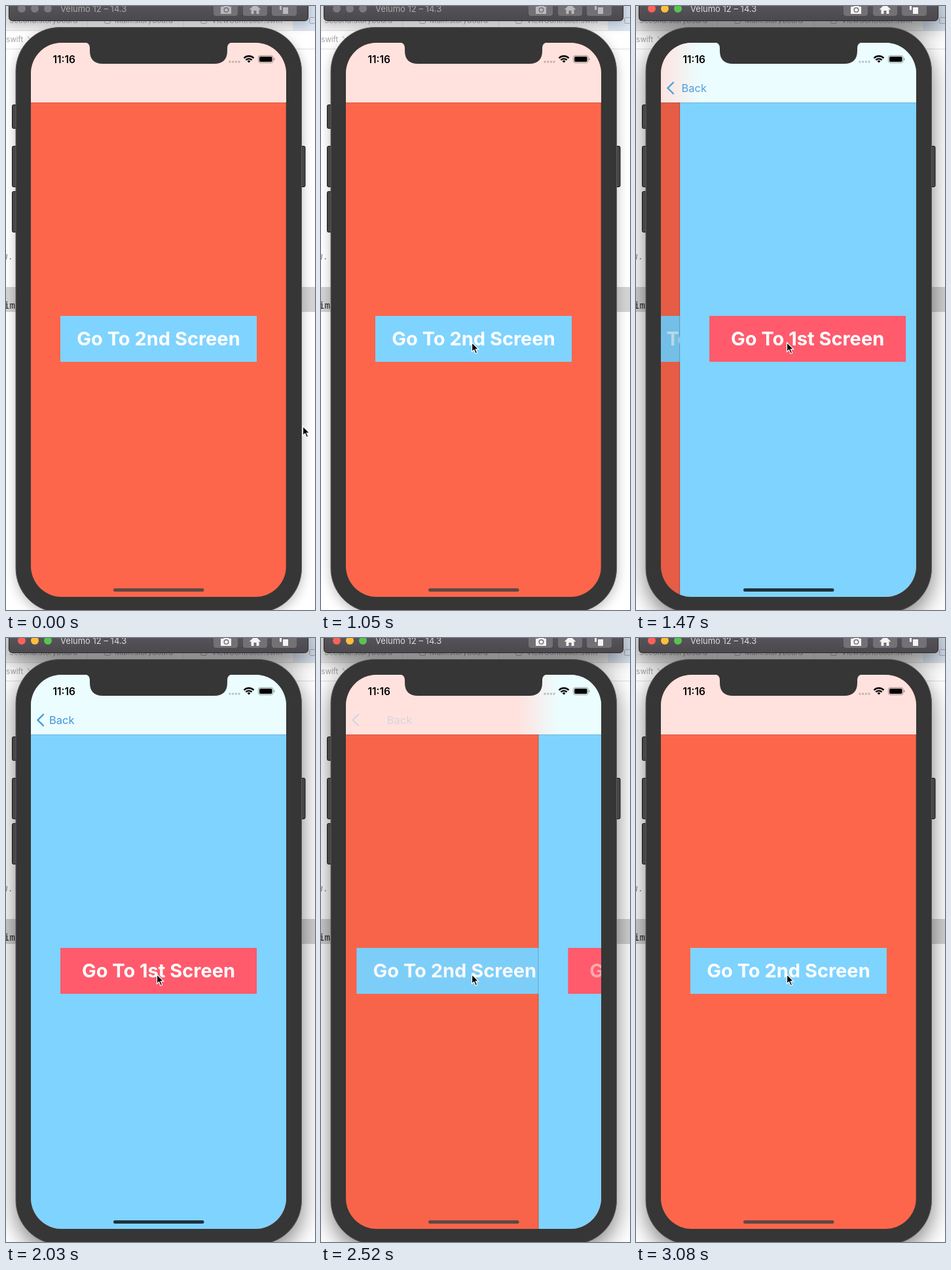
An HTML page that plays this animation: 472x920 px, repeating every 3.15 s.

```html
<!DOCTYPE html>
<html lang="en">
<head>
<meta charset="utf-8">
<title>Screen push and pop</title>
<style>
  html, body { margin: 0; width: 100%; height: 100%; overflow: hidden; background: #fff; }
  svg { display: block; width: 472px; height: 920px; font-family: Inter, "Open Sans", sans-serif; }
  .label { font-size: 29px; font-weight: 700; fill: #fff; text-anchor: middle; }
  .tab { font-size: 11.5px; fill: #a2a2a2; }
  .code { font: 14px "Noto Sans Mono", "DejaVu Sans Mono", monospace; }
  .side rect { fill: #464646; stroke: #161616; }
  .tools rect { fill: #737175; }
</style>
</head>
<body>
<svg viewBox="0 0 472 920">
  <defs>
    <clipPath id="screen"><rect x="38" y="56" width="390" height="844" rx="47"/></clipPath>
    <linearGradient id="barFill" gradientUnits="userSpaceOnUse" y1="0" y2="0">
      <stop stop-color="#ffe2de"/><stop offset="1" stop-color="#ebfdff"/>
    </linearGradient>
    <linearGradient id="titleFill" x2="0" y2="1">
      <stop offset=".3" stop-color="#59575b"/><stop offset="1" stop-color="#4b494d"/>
    </linearGradient>
    <filter id="soft" x="-30%" y="-30%" width="160%" height="160%"><feGaussianBlur id="blur"/></filter>
  </defs>

  <!-- editor behind the simulator -->
  <rect width="472" height="37" fill="#f1f1f1"/>
  <rect x="438" width="34" height="37" fill="#dbe5f3"/>
  <path d="M0 37.5H472M0 65.5H472M124.500 10V37M271.500 10V37" stroke="#dedede"/>
  <g fill="none" stroke="#a8a8a8">
    <rect x="150.500" y="17.500" width="9" height="9" rx="2"/>
    <rect x="297.500" y="17.500" width="9" height="9" rx="2"/>
    <rect x="463.500" y="17.500" width="9" height="9" rx="2"/>
    <path d="M33 46l4 5-4 5"/>
  </g>
  <text class="tab" x="5" y="26">Second.storyboard</text>
  <text class="tab" x="166" y="26">Main.storyboard</text>
  <text class="tab" x="314" y="26">ViewController.swift</text>
  <text class="tab" x="-3" y="55">.swift</text>
  <rect y="428" width="472" height="38" fill="#d3d3d3"/>
  <text class="code" x="-6" y="386" fill="#777">w.</text>
  <text class="code" x="-3" y="461" fill="#222">im</text>

  <g id="shadow" filter="url(#soft)">
    <rect x="4" y="-20" width="458" height="42"/>
    <rect x="15" y="32" width="437" height="892" rx="68"/>
  </g>

  <!-- title bar -->
  <rect x="4.500" y="-20" width="457" height="42.500" rx="5" fill="url(#titleFill)" stroke="#29282a"/>
  <g id="lights"><circle cx="24" cy="4" r="6"/><circle cx="44" cy="4" r="6"/><circle cx="64" cy="4" r="6"/></g>
  <text id="title" x="83" y="9" font-size="13">Velumo 12 – 14.3</text>
  <g class="tools">
    <rect x="317" y="-8" width="37" height="23" rx="4"/>
    <rect x="362" y="-8" width="37" height="23" rx="4"/>
    <rect x="406" y="-8" width="38" height="23" rx="4"/>
  </g>
  <g id="icons">
    <path d="M328 1h4l2-3h5l2 3h3v11h-16z"/>
    <circle cx="336.500" cy="6" r="3.300" fill="none" stroke="#737175" stroke-width="1.500"/>
    <path d="M372 5l8.500-8 8.500 8-1 1-1.500-1v7h-4v-5h-4v5h-4v-7l-1.500 1z"/>
    <path d="M423 2h8v10h-8zM418-4h8v4h-5v6h-3z"/>
  </g>

  <!-- phone -->
  <g class="side">
    <rect x="9.500" y="150.500" width="8" height="36" rx="2"/>
    <rect x="9.500" y="213.500" width="8" height="62" rx="2"/>
    <rect x="9.500" y="282.500" width="8" height="62" rx="2"/>
    <rect x="449" y="213.500" width="8" height="62" rx="2"/>
  </g>
  <rect x="15" y="32.500" width="436.500" height="891" rx="67" fill="#363636" stroke="#5c5c5c"/>

  <g clip-path="url(#screen)">
    <g id="first">
      <rect x="38" y="56" width="507" height="844" fill="#fe664b"/>
      <rect x="83" y="472" width="300" height="70" fill="#7fd3ff"/>
      <text id="label1" class="label" x="233" y="517">Go To 2nd Screen</text>
    </g>
    <rect id="dim" x="38" y="56" width="390" height="844"/>
    <g id="second">
      <rect x="38" y="56" width="390" height="844" fill="#7fd3ff"/>
      <path d="M37.500 147V900" stroke="#000" stroke-opacity=".2"/>
      <rect x="83" y="472" width="300" height="70" fill="#ff5b6d"/>
      <text id="label2" class="label" x="233" y="517">Go To 1st Screen</text>
    </g>
    <rect x="38" y="56" width="390" height="91" fill="url(#barFill)"/>
    <path d="M38 147.300H428" stroke="#000" stroke-opacity=".25" stroke-width=".7"/>
    <g id="back" fill="#3f97da">
      <path d="M57 116.500l-8.500 8.500 8.500 8.500" fill="none" stroke="#3f97da" stroke-width="2.400" stroke-linecap="round"/>
      <text id="backText" x="66" y="131" font-size="16.500">Back</text>
    </g>
    <rect id="home" x="164" y="887" width="138.500" height="5" rx="2.500"/>
  </g>
  <path d="M119 55.500C125 55.500 128 58 128 65V68Q128 88 148 88H318Q338 88 338 68V65C338 58 341 55.500 347 55.500Z" fill="#363636"/>

  <!-- status bar -->
  <text x="71.500" y="86.500" font-size="15.500" font-weight="600">11:16</text>
  <g fill="#000" fill-opacity=".22">
    <circle cx="342" cy="85" r="1.700"/><circle cx="346.700" cy="85" r="1.700"/>
    <circle cx="351.400" cy="85" r="1.700"/><circle cx="356" cy="85" r="1.700"/>
  </g>
  <g fill="none" stroke="#000" stroke-width="2.300">
    <path d="M363.500 79.300a10.800 10.800 0 0 1 15 0M366.300 82.300a6.700 6.700 0 0 1 9.400 0"/>
    <path d="M371 86.500l-2.400-2.600a3.500 3.500 0 0 1 4.800 0z" fill="#000" stroke="none"/>
  </g>
  <rect x="385.500" y="75.500" width="22.500" height="11" rx="3" fill="none" stroke="#000" stroke-opacity=".38"/>
  <rect x="387" y="77" width="19.500" height="8" rx="1.700"/>
  <path d="M409 79v4q1.600-.7 1.600-2t-1.600-2z" fill-opacity=".4"/>

  <path id="cursor" d="M0 0V14.200L3.200 11.300 5.700 17 8.200 15.900 5.800 10.400H10.200Z" stroke="#fff" stroke-width="1.200"/>
</svg>
<script>
const LOOP = 3150, STEP = 70;
const ACTIVE = 1120, PUSH = 1226, PRESS2 = 2290, POP = 2364;
const el = id => document.getElementById(id);
const set = (id, attrs) => {
  for (const name in attrs) el(id).setAttribute(name, attrs[name]);
};
const clamp = v => Math.min(1, Math.max(0, v));
const smooth = v => (v = clamp(v)) * v * (3 - 2 * v);
const mix = (a, b, k) => a + (b - a) * k;
const moveX = x => `translate(${x} 0)`;

// critically damped spring from 0 to 1
const spring = ms => {
  const u = Math.max(0, ms) * 0.01743;
  return 1 - (1 + u) * Math.exp(-u);
};

// label opacity: drops on touch, fades back after release
const touch = (t, down, up) => t < down ? 1 : mix(0.2, 1, clamp((t - up) / 470));

function draw(t) {
  const active = t >= ACTIVE;
  set("blur", { stdDeviation: active ? 17 : 9 });
  set("shadow", { opacity: active ? 0.5 : 0.26, transform: `translate(0 ${active ? 12 : 5})` });
  set("title", { fill: active ? "#dddcde" : "#aaa9ab" });
  set("icons", { fill: active ? "#f4f4f4" : "#b9b8ba" });
  const colors = active ? ["#ff6157", "#ffbe3c", "#58c552"] : Array(3).fill("#7d7b7f");
  [...el("lights").children].forEach((dot, i) => dot.setAttribute("fill", colors[i]));

  const p = spring(t - PUSH) - spring(t - POP);
  const edge = 428 - 390 * p;
  set("first", { transform: moveX(-117 * p) });
  set("dim", { opacity: 0.1 * p });
  set("second", { transform: moveX(edge - 38) });
  set("label1", { opacity: touch(t, ACTIVE, PUSH) });
  set("label2", { opacity: touch(t, PRESS2, POP) });

  const spread = Math.min(32, 1.2 * (edge - 38) + 0.01, 1.2 * (428 - edge) + 0.01);
  set("barFill", { x1: edge - spread, x2: edge + spread });
  set("back", { opacity: p ** 1.2 });
  set("backText", { x: 66 + 46 * (1 - p) });

  const k = smooth((p - 0.3) / 0.6);
  set("home", { fill: `rgb(${mix(94, 30, k)},${mix(72, 50, k)},${mix(69, 62, k)})` });

  const m = smooth((t - 150) / 750);
  set("cursor", { transform: `translate(${mix(453.5, 230.5, m)} ${mix(640, 512.5, m)})` });
}

function tick() {
  draw(Math.floor(performance.now() % LOOP / STEP) * STEP);
  requestAnimationFrame(tick);
}
tick();
</script>
</body>
</html>
```
